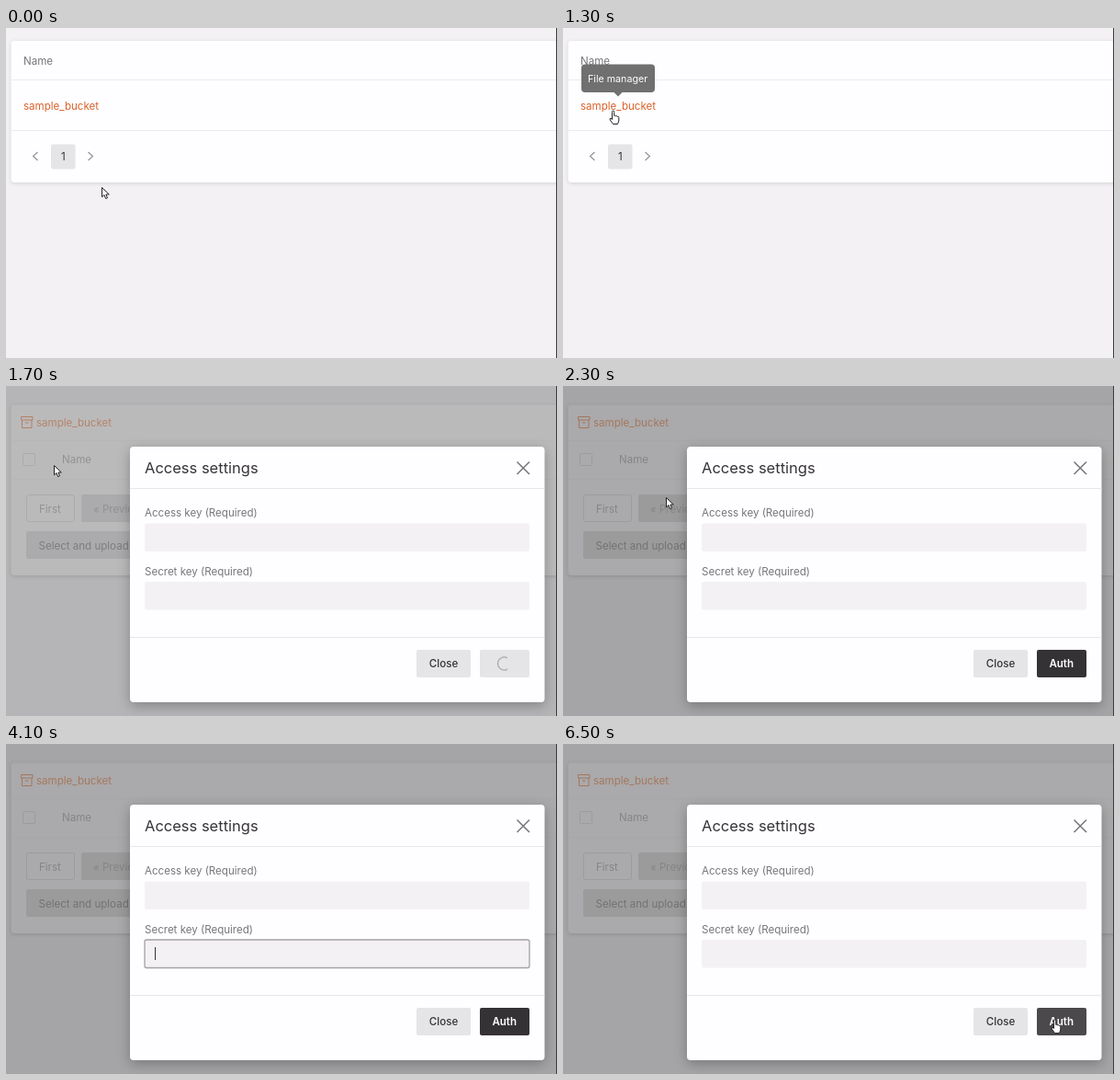
Animation of 600 by 359 pixels, one loop 7.8 s. Source, as an HTML page:

```html
<!DOCTYPE html>
<html lang="en">
<head>
<meta charset="utf-8">
<title>Bucket access</title>
<style>
html, body { margin: 0; height: 100%; overflow: hidden; background: #f3f1f4; }
svg { display: block; }
text { font: 11.55px Inter, sans-serif; fill: #777578; }
.card { fill: #fefdff; filter: drop-shadow(0 1px 2px #0002); }
.line { stroke: #ebeaec; }
.grey { fill: #e5e4e6; }
.field { fill: #f3f1f4; }
.icon { fill: none; stroke: #8f8e90; stroke-width: 1.1; }
.link { fill: #d9632a; }
.pale { fill: #c4c3c5; }
.mid { text-anchor: middle; fill: #333; }
</style>
</head>
<body>
<svg width="600" height="359" viewBox="0 0 600 359">
  <rect width="600" height="359" fill="#f3f1f4"/>

  <g id="list">
    <rect class="card" x="5.5" y="14" width="610" height="154" rx="4"/>
    <path class="line" d="M5.5 56.5H600M5.5 111.5H600"/>
    <text x="19" y="40">Name</text>
    <text class="link" x="19" y="89">sample_bucket</text>
    <path class="icon" d="M34.5 135l-5 4.5 5 4.5M89.500 135l5 4.500-5 4.500"/>
    <rect class="grey" x="49" y="126.500" width="26.500" height="27" rx="2"/>
    <text class="mid" x="62.300" y="144">1</text>
    <g id="tip">
      <path d="M55 69.500h10l-5 5z" fill="#666"/>
      <rect x="20" y="39.500" width="80" height="30.500" rx="4" fill="#666"/>
      <text x="27" y="59" style="font-size:10.7px;fill:#fff">File manager</text>
    </g>
  </g>

  <g id="files">
    <rect class="card" x="5.500" y="20.500" width="610" height="185.500" rx="4" style="fill:#faf9fb"/>
    <path d="M5.500 59.500H600M5.500 101.500H600" stroke="#f5f4f6"/>
    <path d="M16.500 33.500h12.500v3.500h-12.500zM17.500 37v8.500h10.500v-8.500M21 40h3.500" fill="none" stroke="#f0ad86"/>
    <text x="33" y="43.500" style="fill:#f1b08a">sample_bucket</text>
    <rect x="18.500" y="73.500" width="13" height="13" rx="1" fill="none" stroke="#e6e5e7"/>
    <text class="pale" x="61" y="83.500">Name</text>
    <rect x="22.500" y="118.500" width="52" height="29" rx="2" fill="none" stroke="#e6e5e7"/>
    <text class="pale" x="36" y="137.500">First</text>
    <rect class="grey" x="82" y="118" width="78" height="30" rx="2"/>
    <text class="pale" x="95" y="137.500">« Previous</text>
    <rect class="grey" x="22" y="158" width="130" height="30" rx="2"/>
    <text x="35.500" y="177.500" style="fill:#a8a7a9">Select and upload</text>
  </g>

  <rect id="shade" width="600" height="359"/>

  <g id="modal">
    <rect x="135" y="66" width="451.500" height="278" rx="4" fill="#fefdff" style="filter:drop-shadow(0 4px 7px #0004)"/>
    <path d="M135 111.500h451.500M135 273.500h451.500" stroke="#e7e6e8"/>
    <text x="151" y="95" style="font-size:16.5px;fill:#363437">Access settings</text>
    <path d="M556.500 82.500l13.500 13.500m0-13.500l-13.500 13.500" stroke="#777578" stroke-width="1.500"/>
    <text x="151" y="142.300">Access key (Required)</text>
    <rect class="field" x="151" y="149.500" width="419" height="30.500" rx="2"/>
    <text x="151" y="205.700">Secret key (Required)</text>
    <rect class="field" x="151" y="213" width="419" height="30.500" rx="2"/>
    <rect id="ring1" x="151" y="149.500" width="419" height="30.500" rx="2" fill="none" stroke="#a3a2a4" stroke-width="1.300"/>
    <rect id="ring2" x="151" y="213" width="419" height="30.500" rx="2" fill="none" stroke="#a3a2a4" stroke-width="1.300"/>
    <path id="caret" d="M162.500 157v14" stroke="#333"/>
    <rect class="grey" x="447" y="287" width="59" height="30" rx="2"/>
    <text class="mid" x="476.500" y="306" style="font-weight:500">Close</text>
    <rect id="button" x="516" y="287" width="54" height="30" rx="2"/>
    <text id="auth" class="mid" x="542.700" y="306" style="fill:#fff;font-weight:600">Auth</text>
    <path id="spinner" d="M546 308.100A7 7 0 1 1 546 295.900" fill="none" stroke="#aaa9ab" stroke-width="1.300"/>
  </g>

  <path id="arrow" d="M.5 .5V10.800L3 8.600 4.600 12.600 6.500 11.800 4.900 8H8.300Z" fill="#fff" stroke="#222" stroke-linejoin="round"/>
  <path id="hand" d="M3 8.500V1.800Q3 .5 4.100 .5T5.200 1.800V6Q6.300 5.300 7 6.300 8.100 5.800 8.600 6.800 10.300 6.600 10.300 8V11.500L9 15H4L.8 10.500Q0 8.800 1.500 8.700L3 10Z" fill="#fff" stroke="#222" stroke-linejoin="round"/>
  <path d="M599.500 0v359" stroke="#3b3a3c"/>
</svg>
<script>
const LOOP = 7800, STEP = 100;
const el = id => document.getElementById(id);
const clamp = v => Math.max(0, Math.min(1, v));
const within = (t, a, b) => t >= a && t < b;
const fade = (id, v) => el(id).setAttribute('opacity', +v);

// Pointer stops: time, x, y
const stops = [
  [0, 104, 173], [800, 89, 155], [1000, 50.5, 89.5], [1400, 50.5, 89.5],
  [1500, 52, 86], [1900, 52, 86], [2700, 172, 156], [3400, 172, 184],
  [3500, 174, 214], [4500, 531, 244], [4600, 531, 244], [5200, 531.5, 299.5],
  [LOOP, 531.5, 299.5]
];

function pointer(t) {
  const i = stops.findIndex((s, k) => k && t < s[0]);
  const [t0, x0, y0] = stops[i - 1], [t1, x1, y1] = stops[i];
  const u = (t - t0) / (t1 - t0), e = u * u * (3 - 2 * u);
  return [x0 + (x1 - x0) * e, y0 + (y1 - y0) * e];
}

// Focus takes two steps to appear and two to vanish
const focus = (t, on, off) => clamp((t - on + STEP) / 200) - clamp((t - off + STEP) / 200);

function draw(t) {
  fade('list', t < 1500);
  fade('files', t >= 1500);
  fade('tip', t < 1200 ? 0 : clamp(.6 + (t - 1200) / 300));
  fade('shade', t < 1600 ? 0 : t < 1700 ? .05 : t < 1800 ? .255 : .32);
  fade('modal', t >= 1600);

  fade('ring1', focus(t, 3000, 4000));
  fade('ring2', focus(t, 4000, 6400));
  fade('caret', within(t, 3000, 3500) || within(t, 4000, 4500) || within(t, 5100, 5600) || within(t, 6100, 6400));
  el('caret').setAttribute('transform', `translate(0 ${t < 4000 ? 0 : 64})`);

  const [x, y] = pointer(t), ready = t >= 2100, hover = y >= 287;
  el('button').setAttribute('fill', !ready ? '#e5e4e6' : hover ? '#4b494c' : '#353236');
  fade('auth', ready);
  fade('spinner', within(t, 1700, 2100));
  el('spinner').setAttribute('transform', `rotate(${(t - 1700) * .257} 542.5 302)`);

  const hand = within(t, 1000, 1500) || hover;
  const hidden = within(t, 2800, 3400) || within(t, 3600, 4500);
  fade('hand', hand);
  fade('arrow', !hand && !hidden);
  for (const id of ['hand', 'arrow']) el(id).setAttribute('transform', `translate(${x} ${y})`);
}

const start = performance.now();
function tick() {
  const t = (performance.now() - start) % LOOP;
  draw(Math.floor(t / STEP) * STEP);
  requestAnimationFrame(tick);
}
tick();
</script>
</body>
</html>
```
